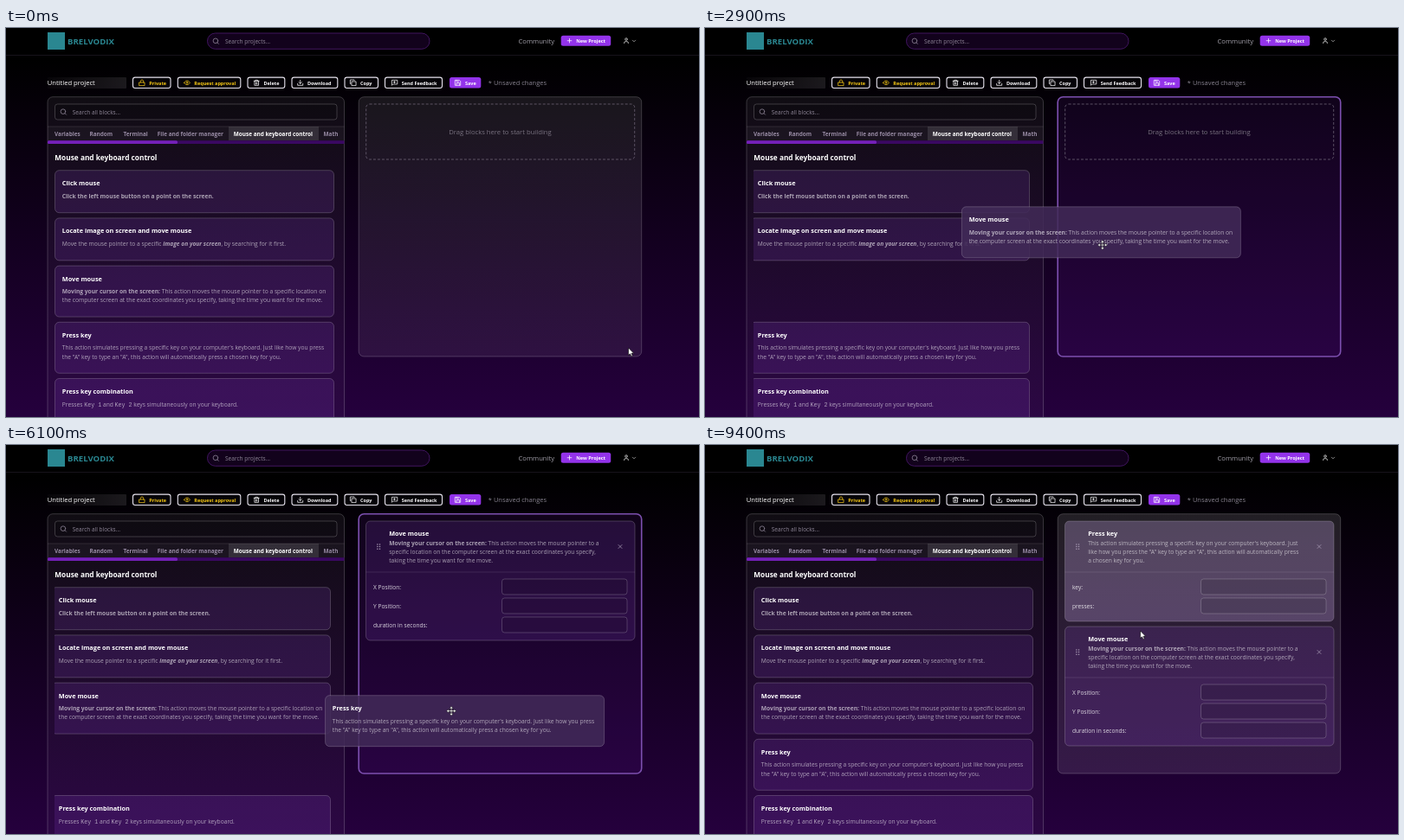
Animation, 800 px wide and 450 px high, one loop 9500 ms. Source, as an HTML page:

```html
<!DOCTYPE html>
<html lang="en">
<head>
<meta charset="utf-8">
<title>Block editor</title>
<style>
html, body { margin: 0; width: 100%; height: 100%; overflow: hidden; background: #000; }
svg { display: block; width: 100%; height: 100%; cursor: default; }
text { font-family: "Open Sans", "Noto Sans", sans-serif; white-space: pre; }
.sb { font-weight: 700; }
.mono { font-family: "Liberation Mono", monospace; }
</style>
</head>
<body>
<svg id="stage" viewBox="0 0 800 450"></svg>
<script>
const LOOP = 9500, STEP = 100;
const stage = document.getElementById('stage');

const rect = (x, y, w, h, r, a) => `<rect x="${x}" y="${y}" width="${w}" height="${h}" rx="${r}" ${a}/>`;
const text = (x, y, size, s, a = 'fill="#fff"') => `<text x="${x}" y="${y}" font-size="${size}" ${a}>${s}</text>`;
const line = (x1, y1, x2, y2, a) => `<path d="M${x1} ${y1}L${x2} ${y2}" ${a}/>`;
const bold = s => `<tspan class="sb">${s}</tspan>`;
const mono = s => `<tspan class="mono">${s}</tspan>`;
// 24-unit outline icon centred on x, y
const icon = (x, y, size, d, color) =>
  `<path transform="translate(${x - size / 2} ${y - size / 2}) scale(${size / 24})" d="${d}" fill="none" stroke="${color}" stroke-width="2.2" stroke-linecap="round" stroke-linejoin="round"/>`;

const ICON = {
  search: 'M19 11a8 8 0 1 1-16 0a8 8 0 1 1 16 0M21 21l-4.3-4.3',
  plus: 'M5 12h14M12 5v14',
  user: 'M19 21v-2a4 4 0 0 0-4-4H9a4 4 0 0 0-4 4v2M16 7a4 4 0 1 1-8 0a4 4 0 1 1 8 0',
  down: 'M6 9l6 6 6-6',
  lock: 'M3 11h18v11H3zM7 11V7a5 5 0 0 1 10 0v4',
  eye: 'M2 12s3-7 10-7 10 7 10 7-3 7-10 7-10-7-10-7zM15 12a3 3 0 1 1-6 0a3 3 0 1 1 6 0',
  trash: 'M3 6h18M19 6v15H5V6M8 6V3h8v3M10 11v6M14 11v6',
  load: 'M21 15v6H3v-6M7 10l5 5 5-5M12 15V3',
  copy: 'M8 8h14v14H8zM4 16H2V2h14v2',
  chat: 'M21 17H7l-4 4V3h18zM12 7v6M9 10h6',
  save: 'M3 3h14l4 4v14H3zM17 21v-8H7v8M7 3v5h8',
  close: 'M18 6L6 18M6 6l12 12'
};

const DIM = 'fill="#fff" fill-opacity=".6"';
const EDGE = 'stroke="#fff" stroke-opacity=".19" stroke-width="1"';
const FILL = 'fill="#a855f7" fill-opacity=".135"';
const HOVER = .15;

const CARDS = [
  { y: 164.7, h: 49, title: 'Click mouse', desc: [bold('Click the left mouse button on a point on the screen.')] },
  { y: 219.9, h: 49, title: 'Locate image on screen and move mouse',
    desc: ['Move the mouse pointer to a specific <tspan class="sb" font-style="italic">image on your screen</tspan>, by searching for it first.'] },
  { y: 275.1, h: 59, title: 'Move mouse', desc: [
    bold('Moving your cursor on the screen:') + ' This action moves the mouse pointer to a specific location on',
    'the computer screen at the exact coordinates you specify, taking the time you want for the move.'] },
  { y: 340.3, h: 59, title: 'Press key', desc: [
    'This action simulates pressing a specific key on your computer\'s keyboard. Just like how you press',
    'the "A" key to type an "A", this action will automatically press a chosen key for you.'] },
  { y: 405.5, h: 59, title: 'Press key combination',
    desc: [`Presses ${mono('Key 1')} and ${mono('Key 2')} keys simultaneously on your keyboard.`] }
];
const CARD_X = 56.5, CARD_W = 322;

const BLOCKS = {
  move: { h: 138, title: 'Move mouse', fields: ['X Position:', 'Y Position:', 'duration in seconds:'], desc: [
    bold('Moving your cursor on the screen:') + ' This action moves the mouse pointer to a',
    'specific location on the computer screen at the exact coordinates you specify,',
    'taking the time you want for the move.'] },
  press: { h: 116, title: 'Press key', fields: ['key:', 'presses:'], desc: [
    'This action simulates pressing a specific key on your computer\'s keyboard. Just',
    'like how you press the "A" key to type an "A", this action will automatically press',
    'a chosen key for you.'] }
};
const BLOCK_X = 415.5, BLOCK_W = 310.5, TOP = 88, GAP = 6;

const cardBody = c => text(8.3, 17.5, 7.3, c.title, 'fill="#fff" class="sb"') +
  c.desc.map((s, i) => text(8.3, 32.2 + i * 10.1, 6.68, s, DIM)).join('');

const card = (c, i) => `<g id="card${i}" transform="translate(${CARD_X} ${c.y})">` +
  rect(0, 0, CARD_W, c.h, 5, `${FILL} ${EDGE}`) +
  rect(0, 0, CARD_W, c.h, 5, 'class="hover" fill="#fff" opacity="0"') + cardBody(c) + '</g>';

const ghost = i => `<g id="ghost${i}">` +
  rect(0, 0, CARD_W, CARDS[i].h, 5, `fill="#422a58" fill-opacity=".86" ${EDGE}`) + cardBody(CARDS[i]) + '</g>';

function block(id) {
  const b = BLOCKS[id];
  let s = rect(0, 0, BLOCK_W, b.h, 5, `${FILL} ${EDGE}`) +
    rect(0, 0, BLOCK_W, b.h, 5, 'class="hover" fill="#fff" opacity="0"') +
    line(0, 59, BLOCK_W, 59, 'stroke="#fff" stroke-opacity=".13" stroke-width=".8"') +
    text(26.7, 17.3, 7.3, b.title, 'fill="#fff" class="sb"') +
    icon(293.5, 29.5, 8, ICON.close, '#a99bb5');
  for (let i = 0; i < 6; i++)
    s += `<circle cx="${13.4 + i % 2 * 2.6}" cy="${27 + (i >> 1) * 2.6}" r=".75" fill="#a99bb5"/>`;
  b.desc.forEach((d, i) => s += text(26.7, 28 + i * 10.1, 6.65, d, DIM));
  b.fields.forEach((f, i) => {
    const y = 76 + i * 22;
    s += text(8.5, y + 2.5, 6.6, f, 'fill="#fff" fill-opacity=".82"') +
      rect(157, y - 9, 144.5, 18, 3, `fill="#000" fill-opacity=".12" ${EDGE}`);
  });
  return `<g id="${id}">${s}</g>`;
}

function button(x, w, label, tx, ic, color = '#fff', purple = false) {
  return rect(x, 57.1, w, 12.4, 2.5, purple ? 'fill="#9333ea"' : 'fill="#050308" stroke="#e8e4ee" stroke-width="1.1"') +
    icon(tx - 8.3, 63.3, 8, ICON[ic], color) + text(tx, 65.5, 5.5, label, `fill="${color}" class="sb"`);
}

const header = () =>
  rect(0, 0, 800, 31, 0, 'fill="#000"') + line(0, 31.5, 800, 31.5, 'stroke="#17131b" stroke-width="1"') +
  rect(48, 5, 20, 20, 0, 'fill="#2a8791"') + text(71, 19, 9.6, 'BRELVODIX', 'fill="#2a8791" class="sb"') +
  rect(232.5, 6, 256.5, 18.3, 9.1, 'fill="#12021c" stroke="#40155f" stroke-width="1"') +
  icon(242.3, 15.2, 8.5, ICON.search, '#8f8798') + text(253, 17.7, 6.55, 'Search projects...', 'fill="#8f8798"') +
  text(591.5, 18.2, 7.65, 'Community', 'fill="#a3a0aa"') +
  rect(640.7, 8.7, 57.5, 12, 2.5, 'fill="#9333ea"') + icon(650.5, 14.7, 8, ICON.plus, '#fff') +
  text(658.3, 16.8, 5.6, 'New Project', 'fill="#fff" class="sb"') +
  icon(716, 14.7, 8, ICON.user, '#e5e5e5') + icon(725, 15, 6.5, ICON.down, '#e5e5e5');

const toolbar = () =>
  rect(48, 57, 91, 13, 1, 'fill="url(#input)"') + text(47.8, 66.2, 7.6, 'Untitled project') +
  button(146.5, 43.5, 'Private', 165.3, 'lock', '#facc15') +
  button(198.3, 72.5, 'Request approval', 217.3, 'eye', '#facc15') +
  button(279, 42.8, 'Delete', 297.5, 'trash') +
  button(330, 52.8, 'Download', 348, 'load') +
  button(391, 38.5, 'Copy', 409, 'copy') +
  button(437.5, 66, 'Send Feedback', 456.7, 'chat') +
  button(512, 36.3, 'Save', 530, 'save', '#fff', true) +
  text(556.8, 66.2, 7.5, '* Unsaved changes', 'fill="#86808e"');

const TABS = [[56, 'Variables'], [96.5, 'Random'], [135.5, 'Terminal'], [174.8, 'File and folder manager'],
  [262.8, 'Mouse and keyboard control'], [366.5, 'Math']];

const leftPanel = () =>
  rect(48, 79.7, 342.5, 400, 6, `fill="url(#panel)" ${EDGE}`) +
  rect(48, 79.7, 342.5, 400, 6, 'id="glowL" fill="#fff" opacity="0"') +
  rect(56.5, 88, 325.5, 18, 3, `fill="#000" fill-opacity=".15" ${EDGE}`) +
  icon(66.3, 97, 8.5, ICON.search, '#8f8798') + text(76.8, 99.5, 6.5, 'Search all blocks...', 'fill="#8f8798"') +
  rect(48, 114, 342.5, 16, 0, 'fill="#fff" fill-opacity=".03"') +
  line(48, 114, 390.5, 114, 'stroke="#fff" stroke-opacity=".13" stroke-width=".8"') +
  rect(257, 114, 104, 16, 0, 'fill="#fff" fill-opacity=".11"') +
  TABS.map(([x, s], i) => text(x, 125, 6.42, s, `fill="${i === 4 ? '#fff' : '#978aa3'}" class="sb"`)).join('') +
  rect(48, 130.2, 342.5, 3.8, 0, 'fill="#3a0862"') + rect(48, 130.2, 150, 3.8, 1.5, 'fill="#7420b8"') +
  text(56.3, 153, 8.3, 'Mouse and keyboard control', 'fill="#fff" class="sb"') +
  `<g clip-path="url(#listClip)"><g id="list">${CARDS.map(card).join('')}</g></g>`;

const rightPanel = () =>
  rect(407.2, 79.7, 326.5, 300.3, 6, `id="drop" fill="url(#panel)" ${EDGE}`) +
  rect(407.2, 79.7, 326.5, 300.3, 6, 'id="glowR" fill="#fff" opacity="0"') +
  '<g id="empty">' +
  rect(415.7, 88, 310, 64, 4, 'fill="none" stroke="#6c6275" stroke-opacity=".8" stroke-width="1" stroke-dasharray="3 2"') +
  text(570.5, 123, 7.68, 'Drag blocks here to start building', 'fill="#77707e" text-anchor="middle"') + '</g>' +
  block('move') + block('press');

const pointers = () =>
  '<path id="arrow" d="M0 0V8.6L2 6.8L3.4 9.9L4.8 9.2L3.5 6.3H6.2Z" fill="#fff" stroke="#000" stroke-width=".6"/>' +
  '<path id="cross" d="M0 -5.5L2 -3H.6V-.6H3V-2L5.5 0L3 2V.6H.6V3H2L0 5.5L-2 3H-.6V.6H-3V2L-5.5 0L-3 -2V-.6H-.6V-3H-2Z" fill="#fff" stroke="#111" stroke-width=".5"/>';

stage.innerHTML = `<defs>
  <linearGradient id="bg" x2="0" y2="1"><stop offset=".08" stop-color="#000"/><stop offset=".45" stop-color="#0f0019"/><stop offset="1" stop-color="#25003d"/></linearGradient>
  <linearGradient id="panel" x2="0" y2="1"><stop stop-color="#fff" stop-opacity=".05"/><stop offset="1" stop-color="#e6c8ff" stop-opacity=".035"/></linearGradient>
  <linearGradient id="input"><stop stop-color="#fff" stop-opacity=".02"/><stop offset="1" stop-color="#fff" stop-opacity=".1"/></linearGradient>
  <clipPath id="listClip"><rect x="56" y="160" width="334" height="290"/></clipPath>
</defs>` + rect(0, 0, 800, 450, 0, 'fill="url(#bg)"') + header() + toolbar() + leftPanel() + rightPanel() +
  ghost(2) + ghost(3) + pointers();

const $ = id => document.getElementById(id);
const clamp = v => Math.max(0, Math.min(1, v));
const smooth = p => p * p * (3 - 2 * p);
const ramp = (t, a, b) => smooth(clamp((t - a) / (b - a)));
const show = (el, on) => el.setAttribute('display', on ? 'inline' : 'none');
const place = (el, x, y) => el.setAttribute('transform', `translate(${x} ${y})`);
const inside = (p, x, y, w, h) => p.x >= x && p.x <= x + w && p.y >= y && p.y <= y + h;

// Pointer stops: time, x, y
const PATH = [
  [0, 718.5, 370], [1000, 240, 188], [1400, 222, 196], [2000, 219, 320], [2200, 219, 320],
  [3200, 525, 232], [3300, 525, 232], [3700, 527, 223], [4300, 527, 223], [5300, 202, 359], [5400, 203, 361],
  [6300, 559, 300], [6500, 559, 300], [7200, 424, 264.5], [7300, 422.5, 264], [7400, 430, 262],
  [7900, 431, 120], [8400, 431, 120], [9000, 485, 120], [9400, 502.5, 215]
];
function pointer(t) {
  let i = 0;
  while (i < PATH.length - 2 && t >= PATH[i + 1][0]) i++;
  const [t0, x0, y0] = PATH[i], [t1, x1, y1] = PATH[i + 1], p = ramp(t, t0, t1);
  return { x: x0 + (x1 - x0) * p, y: y0 + (y1 - y0) * p };
}

const DRAGS = [{ card: 2, grab: 2200, from: 2200, to: 3400 }, { card: 3, grab: 5300, from: 5500, to: 6500 }];

function render(t) {
  const p = pointer(t), was = pointer(Math.max(0, t - STEP));
  const drag = DRAGS.find(d => t >= d.from && t < d.to);
  const sorting = t >= 7400 && t < 8300;
  const over = !!drag && p.x > 407;

  $('list').setAttribute('transform', `translate(${drag ? -4 * ramp(t, drag.from + 200, drag.from + 500) : 0} 0)`);
  let onCard = false;
  CARDS.forEach((c, i) => {
    const el = $('card' + i), box = [CARD_X, c.y, CARD_W, c.h];
    show(el, !drag || drag.card !== i);
    onCard = onCard || inside(p, ...box);
    el.querySelector('.hover').setAttribute('opacity', !drag && inside(was, ...box) ? HOVER : 0);
  });
  for (const d of DRAGS) {
    const el = $('ghost' + d.card), o = pointer(d.grab);
    show(el, d === drag);
    place(el, CARD_X + p.x - o.x, CARDS[d.card].y + p.y - o.y + .7);
  }

  const drop = $('drop');
  drop.setAttribute('fill', over ? '#7e22ce' : 'url(#panel)');
  drop.setAttribute('fill-opacity', over ? .1 : 1);
  drop.setAttribute('stroke', over ? '#7d50b0' : '#fff');
  drop.setAttribute('stroke-opacity', over ? 1 : .19);
  drop.setAttribute('stroke-width', over ? 1.6 : 1);
  const glowL = ramp(t, 500, 1000) - ramp(t, 2200, 2600) + ramp(t, 4800, 5300) - ramp(t, 5400, 5800);
  const glowR = .5 - .5 * ramp(t, 2300, 2700) + .5 * ramp(t, 3700, 3900) - .5 * ramp(t, 5400, 5700) + ramp(t, 6600, 7100);
  $('glowL').setAttribute('opacity', .075 * glowL);
  $('glowR').setAttribute('opacity', .075 * glowR);

  show($('empty'), t < 3400);
  const swap = ramp(t, 7500, 7900), settle = ramp(t, 8000, 8300);
  const pos = { move: { x: BLOCK_X, y: TOP + swap * (BLOCKS.press.h + GAP) },
    press: { x: BLOCK_X, y: TOP + BLOCKS.move.h + GAP } };
  if (t >= 7400) {
    const o = pointer(7400), k = 1 - settle;
    pos.press = { x: BLOCK_X + (p.x - o.x) * k, y: TOP + (pos.press.y + p.y - o.y - TOP) * k };
  }
  for (const id in pos) {
    const el = $(id), q = pos[id];
    const hot = sorting ? id === 'press'
      : !drag && t >= 3800 && inside(was, q.x, q.y, BLOCK_W, BLOCKS[id].h);
    show(el, t >= (id === 'move' ? 3400 : 6500));
    place(el, q.x, q.y);
    el.querySelector('.hover').setAttribute('opacity', hot ? HOVER : 0);
  }

  const cross = !!drag || onCard || sorting;
  show($('cross'), cross);
  show($('arrow'), !cross);
  place($(cross ? 'cross' : 'arrow'), p.x, p.y);
}

const start = performance.now();
function tick() {
  const t = (performance.now() - start) % LOOP;
  render(Math.floor(t / STEP) * STEP);
  requestAnimationFrame(tick);
}
render(0);
requestAnimationFrame(tick);
</script>
</body>
</html>
```
